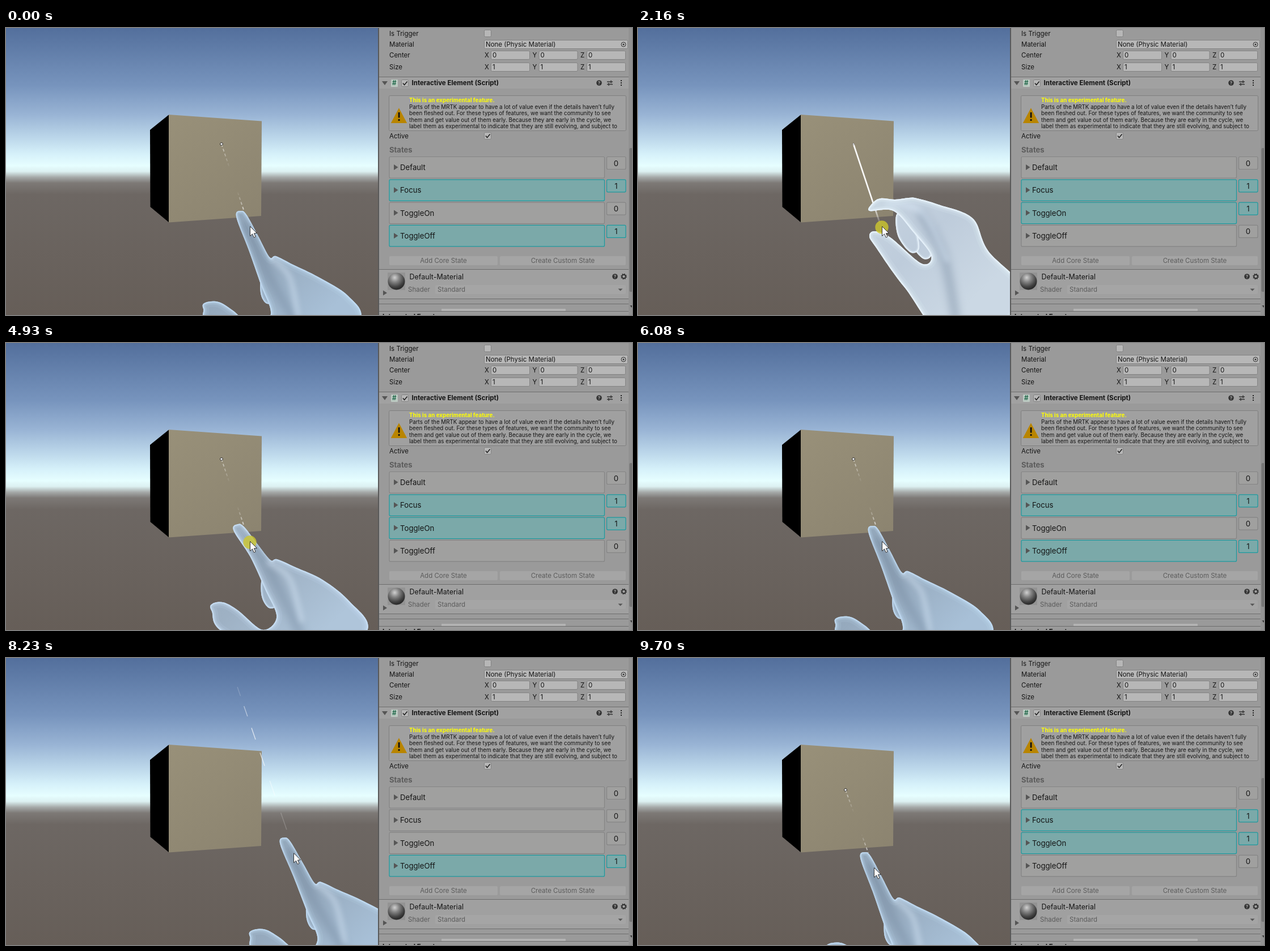
Recreate the animation shown at these times as an HTML page with a canvas. Size 1104 by 507 pixels, loop 9.77 s.

```html
<!DOCTYPE html>
<html lang="en">
<head>
<meta charset="utf-8">
<title>Interactive element states</title>
<style>
html, body { margin: 0; width: 100%; height: 100%; overflow: hidden; background: #999; }
canvas, svg { position: absolute; left: 0; top: 0; display: block; }
svg { font-family: Inter, Roboto, sans-serif; font-size: 11.5px; fill: #141414; }
.bold { font-weight: 700; }
.dim { fill: #5c5c5c; }
.note { font-size: 9.8px; }
.field { fill: #b7b7b7; stroke: #838383; }
.line { stroke: #6d6d6d; }
.state { font-size: 13.2px; }
.state rect { fill: #a0a09f; stroke: #858585; }
.state.on rect { fill: #7ba9a9; stroke: #1c9a9f; }
</style>
</head>
<body>
<canvas id="scene" width="656" height="507"></canvas>
<svg id="panel" width="1104" height="507" viewBox="0 0 1104 507"></svg>
<script>
const LOOP = 9770;
const RELEASE = 300;
const NAMES = ['Default', 'Focus', 'ToggleOn', 'ToggleOff'];

// Mouse down and up; every click flips the toggle.
const CLICKS = [[80, 700], [1850, 2165], [3240, 3780], [4930, 5310], [8780, 9310]];

// ---------- inspector panel ----------
const rect = (x, y, w, h, fill, extra = '') =>
  `<rect x="${x}" y="${y}" width="${w}" height="${h}" fill="${fill}" ${extra}/>`;
const box = (x, y, w, h) =>
  `<rect class="field" x="${x + .5}" y="${y + .5}" width="${w - 1}" height="${h - 1}" rx="2"/>`;
const text = (x, y, s, cls = '', extra = '') => `<text x="${x}" y="${y}" class="${cls}" ${extra}>${s}</text>`;
const path = (d, fill, stroke = 'none', w = 1) =>
  `<path d="${d}" fill="${fill}" stroke="${stroke}" stroke-width="${w}"/>`;
const disc = (x, y, r, fill, extra = '') => `<circle cx="${x}" cy="${y}" r="${r}" fill="${fill}" ${extra}/>`;
const rule = y => `<path class="line" d="M658 ${y}H1098"/>`;
const help = (x, y) => disc(x, y, 4.8, '#333') +
  text(x, y + 3, '?', 'bold', 'font-size="8" style="fill:#aaa" text-anchor="middle"');
const check = (x, y, on) => box(x, y, 13, 13) +
  (on ? path(`M${x + 3} ${y + 6.5}l2.6 3 5-6`, 'none', '#222', 1.6) : '');
const button = (x, w, label) => rect(x, 403, w, 16, '#a5a5a5', 'rx="2"') +
  text(x + w / 2, 415, label, 'dim', 'text-anchor="middle"');

function vectorRow(y, label, value) {
  return text(676, y + 4, label) + ['X', 'Y', 'Z'].map((axis, i) => {
    const x = 844 + i * 84.5;
    return text(x, y + 4, axis) + box(x + 11, y - 8, 69, 16) + text(x + 14, y + 4, value);
  }).join('');
}

function stateRow(name, i) {
  const y = 227 + i * 40.3;
  return `<g class="state">
    <rect x="676" y="${y + .5}" width="379.5" height="37.5" rx="2" stroke-width="1.2"/>
    <rect x="1059.5" y="${y + .5}" width="33.5" height="22" rx="2" stroke-width="1.2"/>
    ${path(`M684 ${y + 14}l7.5 5-7.5 5z`, '#565656')}
    ${text(695, y + 24, name)}
    ${text(1076, y + 16.5, '0', 'value', 'text-anchor="middle"')}</g>`;
}

const NOTE = [
  'Parts of the MRTK appear to have a lot of value even if the details haven’t fully',
  'been fleshed out. For these types of features, we want the community to see',
  'them and get value out of them early. Because they are early in the cycle, we',
  'label them as experimental to indicate that they are still evolving, and subject to'
];

const panel = document.getElementById('panel');
panel.innerHTML = `<defs><radialGradient id="ball" cx=".4" cy=".28" r=".75">
    <stop offset="0" stop-color="#d0d0d0"/><stop offset=".35" stop-color="#858585"/>
    <stop offset=".75" stop-color="#404040"/><stop offset="1" stop-color="#222"/></radialGradient></defs>` +
  rect(656, 0, 448, 507, '#9a9a9a') + rect(656, 0, 2, 507, '#595959') +
  text(676, 14, 'Is Trigger') + check(843, 3, false) +
  text(676, 33, 'Material') + box(843, 21, 254, 16) + text(846, 33, 'None (Physic Material)') +
  disc(1089, 29, 4, 'none', 'stroke="#333"') + disc(1089, 29, 1.5, '#333') +
  vectorRow(48, 'Center', 0) + vectorRow(69, 'Size', 1) +
  rect(658, 87, 440, 20, '#a1a1a1') + rule(86.5) +
  path('M663 94h10l-5 7z', '#555') +
  rect(679, 91, 12, 13, '#bccac2', 'rx="1"') + text(681, 101, '#', 'bold', 'style="fill:#246b4d"') +
  check(697, 91, true) + text(715.5, 101, 'Interactive Element (Script)', 'bold') +
  help(1046, 97) + path('M1060 95h10M1060 99.5h10M1067 92.5v5M1063 97v5', 'none', '#333', 1.4) +
  [93, 97, 101].map(y => rect(1084, y - 1, 2, 2, '#222')).join('') +
  rect(675.5, 119.5, 418, 62, '#a0a0a0', 'rx="2" stroke="#7f7f7f"') +
  path('M693 143.5L705.5 167H680.5z', '#b98500', '#b98500', 2) +
  rect(691.7, 149, 2.8, 9.5, '#111') + rect(691.7, 161, 2.8, 3, '#111') +
  text(711, 131, 'This is an experimental feature.', 'note bold', 'style="fill:#ff0"') +
  NOTE.map((s, i) => text(711, 142.5 + i * 11.5, s, 'note')).join('') +
  text(676, 195, 'Active') + check(843, 184, true) +
  text(676, 219.5, 'States', 'bold dim', 'font-size="13"') +
  NAMES.map(stateRow).join('') +
  button(676, 191, 'Add Core State') + button(871, 222, 'Create Custom State') +
  rect(658, 427, 440, 51, '#a0a0a0') + rule(426.5) +
  rect(673, 432, 31, 31, '#939393') + disc(688.5, 447.5, 15, 'url(#ball)') +
  text(711.5, 444, 'Default-Material', '', 'font-size="12.5"') + help(1074, 439) +
  disc(1089.5, 439, 3.3, 'none', 'stroke="#333" stroke-width="2"') +
  disc(1089.5, 439, 4.6, 'none', 'stroke="#333" stroke-width="1.5" stroke-dasharray="1.8"') +
  path('M665 463.5l7 4.5-7 4.5z', '#555') +
  text(709, 466, 'Shader', 'dim') + rect(757, 454, 336, 16, '#a5a5a5', 'rx="2"') +
  text(761, 466, 'Standard', 'dim') + path('M1079.5 460.5h8l-4 4z', '#555') +
  rule(478.5) + rule(487.5) + rect(768, 496, 219, 4, '#b3b3b3', 'rx="1"') + rule(500.5) +
  text(664, 514, 'Integrated Events', 'bold') +
  rect(1098, 0, 6, 507, '#929292') + rect(1099.5, 212, 5, 254, '#757575', 'rx="2"') +
  path('M1100.5 490h5l-2.5 4z', '#444');

const rows = [...panel.querySelectorAll('.state')];
function setStates(values) {
  rows.forEach((row, i) => {
    row.classList.toggle('on', !!values[i]);
    row.querySelector('.value').textContent = values[i];
  });
}

// ---------- hand: key points of the open and the pinched pose ----------
const parse = s => s.split(' ').map(p => p.split(',').map(Number));
const HAND = [
  '406,333 415,323 425,331 446,370 465,405 476,403 506,418 551,440 603,473 625,515 ' +
  '560,580 370,530 348,496 352,485 375,484 400,499 440,530 467,505 450,455 428,392',
  '408,323 415,308 428,301 453,303 478,300 492,301 530,312 590,336 617,393 685,480 ' +
  '560,560 470,458 420,388 408,368 417,359 445,370 500,416 517,402 485,360 450,323'
].map(parse);
const CURL = ['452,435 449,468 460,487 478,478 475,440', '457,328 458,366 480,396 496,388 485,345'].map(parse);
const GLOW = ['470,408 500,440 515,510', '440,311 500,325 545,410'].map(parse);
const SHADE = ['423,350 465,440 510,520', '500,330 538,400 560,510'].map(parse);

const lerp = (a, b, k) => a + (b - a) * k;
const clamp = k => Math.max(0, Math.min(1, k));

// Blend two poses; the fingertip swings out a little on the way.
function mix([open, pinched], p) {
  const swing = 10 * Math.sin(Math.PI * p);
  return open.map(([x, y], i) => {
    const py = lerp(y, pinched[i][1], p);
    return [lerp(x, pinched[i][0], p) - swing * clamp((400 - py) / 80), py];
  });
}
const tint = (a, b, p) => `rgb(${a.map((v, i) => Math.round(lerp(v, b[i], p)))})`;
const white = alpha => `rgba(255,255,255,${alpha})`;

const ctx = document.getElementById('scene').getContext('2d');

function curve(pts, closed) {
  const n = pts.length;
  const at = i => closed ? pts[(i + n) % n] : pts[Math.max(0, Math.min(n - 1, i))];
  ctx.beginPath();
  ctx.moveTo(...pts[0]);
  for (let i = 0; i < (closed ? n : n - 1); i++) {
    const [a, b, c, d] = [at(i - 1), at(i), at(i + 1), at(i + 2)];
    ctx.bezierCurveTo(b[0] + (c[0] - a[0]) / 6, b[1] + (c[1] - a[1]) / 6,
      c[0] - (d[0] - b[0]) / 6, c[1] - (d[1] - b[1]) / 6, c[0], c[1]);
  }
}

function poly(color, ...pts) {
  ctx.beginPath();
  pts.forEach(p => ctx.lineTo(...p));
  ctx.closePath();
  ctx.fillStyle = color;
  ctx.fill();
}

function line(x1, y1, x2, y2, color, width) {
  ctx.beginPath();
  ctx.moveTo(x1, y1);
  ctx.lineTo(x2, y2);
  ctx.strokeStyle = color;
  ctx.lineWidth = width;
  ctx.stroke();
}

function gradient(x1, y1, x2, y2, stops) {
  const g = ctx.createLinearGradient(x1, y1, x2, y2);
  stops.forEach(([k, color]) => g.addColorStop(k, color));
  return g;
}

const sky = gradient(0, 0, 0, 507, [
  [0, '#536f9c'], [.2, '#7794bd'], [.3, '#98b3d4'], [.39, '#bfdaec'], [.44, '#d6f1fa'], [.48, '#e6feff'],
  [.5, '#dcf0f1'], [.52, '#a5a9a8'], [.54, '#7d7976'], [.58, '#6d6763'], [1, '#665e58']
]);
const front = gradient(300, 150, 430, 345, [[0, '#989079'], [1, '#8c8470']]);

// Fill a shape and lay a soft bright rim inside its edge.
function flesh(pts, p, depth) {
  ctx.save();
  curve(pts, true);
  ctx.fillStyle = gradient(400, 320, 570, 500, [
    [0, tint([142, 161, 180], [198, 211, 224], p)],
    [.45, tint([150, 170, 190], [190, 204, 219], p)],
    [1, tint([168, 192, 215], [203, 216, 228], p)]
  ]);
  ctx.fill();
  ctx.clip();
  ctx.strokeStyle = tint([196, 222, 246], [236, 247, 255], p);
  for (let w = depth; w > 2; w *= .6) {
    ctx.lineWidth = w;
    ctx.globalAlpha = Math.min(.7, 2 / w);
    ctx.stroke();
  }
  ctx.restore();
}

function streak(pts, color, width, blur) {
  ctx.filter = `blur(${blur}px)`;
  ctx.strokeStyle = color;
  ctx.lineWidth = width;
  curve(pts, false);
  ctx.stroke();
  ctx.filter = 'none';
}

function drawHand(ox, oy, p) {
  ctx.save();
  ctx.translate(416 + ox, 330 + oy);
  ctx.rotate(-ox * 4e-4);
  ctx.translate(-416, -330);
  ctx.lineCap = ctx.lineJoin = 'round';
  const curl = mix(CURL, p);
  for (const d of [22, 0]) flesh(curl.map(([x, y]) => [x + d, y + d / 2]), p, 8);
  const outline = mix(HAND, p);
  flesh(outline, p, 20);
  curve(outline, true);
  ctx.clip();
  streak(mix(SHADE, p), 'rgba(110,130,152,.4)', 16, 7);
  streak(mix(GLOW, p), 'rgba(225,240,255,.4)', 9, 5);
  ctx.restore();
}

// Without a hit the ray runs on upwards in shrinking dashes.
function drawMiss(ox, oy) {
  const x = y => 418 + ox + (y - 303) * .345;
  for (let i = 0, y = 303, gap = 60; i < 6; i++, y -= gap, gap *= .88) {
    const end = y - gap / 2;
    line(x(y), y + oy + 6, x(end), end + oy + 6, white(.2 + .5 * Math.sin(Math.PI * i / 5)), 1.4);
  }
}

function drawRay(ox, oy, p) {
  const x = 380 + ox, y = 205 + oy * 1.4;
  const solid = p > .4;
  const ex = (solid ? 428 : 420) + ox, ey = (solid ? 349 : 324) + oy;
  const fade = solid
    ? [[0, white(.95)], [.72, white(.95)], [1, white(0)]]
    : [[0, white(.6)], [.36, white(0)], [.7, white(0)], [1, white(.7)]];
  ctx.setLineDash(solid ? [] : [5, 4]);
  line(x, y, ex, ey, gradient(x, y, ex, ey, fade), solid ? 2.6 : 1.8);
  ctx.setLineDash([]);
  ctx.beginPath();
  ctx.arc(x, y, solid ? 1.5 : 2.3, 0, 7);
  ctx.fillStyle = '#fff';
  ctx.fill();
  ctx.strokeStyle = solid ? 'rgba(60,60,60,.5)' : '#222';
  ctx.lineWidth = 1;
  ctx.stroke();
}

function drawPointer(ox, oy, pressed) {
  ctx.save();
  ctx.translate(430.5 + ox, 350.5 + oy);
  if (pressed) {
    ctx.beginPath();
    ctx.arc(-.5, 1.5, 11.7, 0, 7);
    ctx.fillStyle = 'rgba(206,200,46,.8)';
    ctx.fill();
  }
  poly('#fff', [0, 0], [0, 17], [4, 13.3], [6.8, 19.5], [9.6, 18.2], [6.9, 12.3], [12, 12]);
  ctx.strokeStyle = '#333';
  ctx.lineWidth = 1;
  ctx.stroke();
  ctx.restore();
}

// ---------- time ----------
// Swing out to the right and settle at a new place.
function sway(t, from, to, rise, endX, endY) {
  const k = clamp((t - from) / (to - from));
  const out = Math.sin(Math.PI * k) ** 2, settle = k * k * (3 - 2 * k);
  return [84 * out + endX * settle, endY * settle - rise * out];
}

function offset(t) {
  const a = sway(t, 6080, 6860, 8, 4, 0);
  const b = sway(t, 7690, 8700, 17, -18, 20);
  return [a[0] + b[0], a[1] + b[1]];
}

function pose(t) {
  let p = 0, pressed = false, on = 0;
  for (const [down, up] of CLICKS) {
    const flip = up + 74, open = up + RELEASE;
    if (t >= flip) on ^= 1;
    if (t < down || t >= open) continue;
    pressed = t < up;
    p = t < flip ? clamp(.2 + (t - down) / 190) : (open - t) / (open - flip);
  }
  return { p, pressed, on };
}

function render(t) {
  const { p, pressed, on } = pose(t), [ox, oy] = offset(t);
  const focus = ox < 71;
  ctx.fillStyle = sky;
  ctx.fillRect(0, 0, 656, 507);
  poly('#000', [287.5, 153], [254, 180], [254.5, 316], [287.5, 343.5]);
  poly(front, [287, 153], [451, 164.5], [450, 332], [287, 343.5]);
  if (focus) drawRay(ox, oy, p);
  else drawMiss(ox, oy);
  drawHand(ox, oy, p);
  drawPointer(ox, oy, pressed);
  setStates([0, +focus, on, 1 - on]);
}

const start = performance.now();
function tick() {
  render((performance.now() - start) % LOOP);
  requestAnimationFrame(tick);
}
tick();
</script>
</body>
</html>
```
